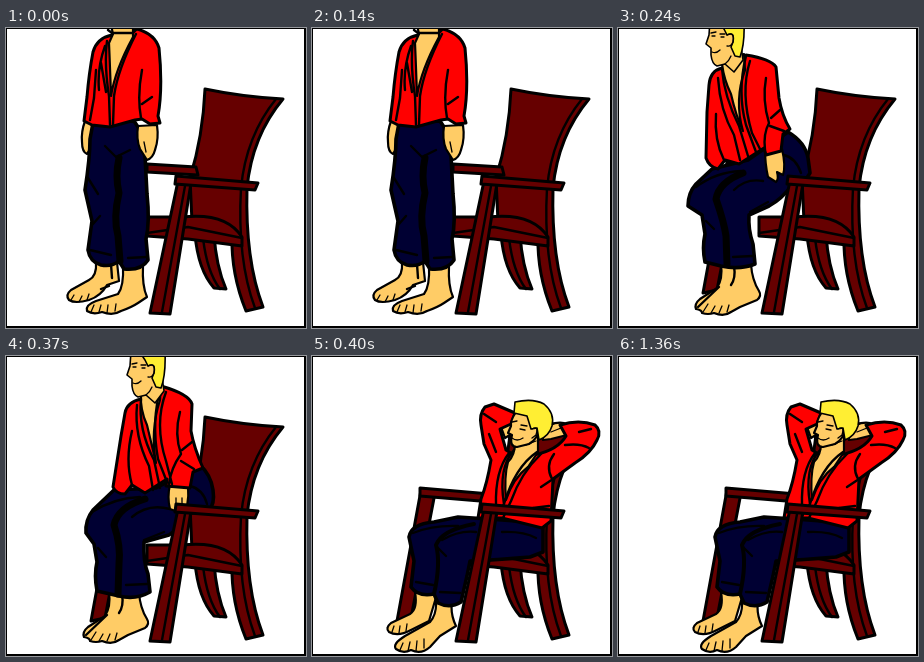
Write an HTML page that moves like this. It is 300 px wide and 300 px high and loops after 2 s.

```html
<!DOCTYPE html>
<html lang="en">
<head>
<meta charset="utf-8">
<title>Sitting down</title>
<style>
  html, body { margin: 0; width: 100%; height: 100%; overflow: hidden; background: #fff; }
  svg { display: block; width: 100vw; height: 100vh; }
  path { stroke: #000; stroke-width: 2.4; stroke-linejoin: round; stroke-linecap: round; fill: none; }
  .wood { fill: #660000; stroke-width: 3; }
  .red { fill: #f00; stroke-width: 3; }
  .navy { fill: #000033; stroke-width: 3.6; }
  .skin { fill: #ffcc66; stroke-width: 2.2; }
  .hair { fill: #ffee33; stroke-width: 1.6; }
  .thin { stroke-width: 1.3; }
  .fold { stroke-width: 7; }
  .frame { stroke-width: 2; stroke-linejoin: miter; }
  .pose { visibility: hidden; animation: 2s step-end infinite; }
  #stand { animation-name: stand; }
  #lean { animation-name: lean; }
  #perch { animation-name: perch; }
  #relax { animation-name: relax; }
  @keyframes stand { 0% { visibility: visible } 12%, 100% { visibility: hidden } }
  @keyframes lean { 0% { visibility: hidden } 12% { visibility: visible } 16%, 100% { visibility: hidden } }
  @keyframes perch { 0% { visibility: hidden } 16% { visibility: visible } 20%, 100% { visibility: hidden } }
  @keyframes relax { 0% { visibility: hidden } 20%, 100% { visibility: visible } }
</style>
</head>
<body>
<svg viewBox="0 0 300 300">
  <defs>
    <g id="feet">
      <path class="skin" d="M103 236Q105 251 99 260L82 271Q76 276 78 281Q84 282 84 285Q90 287 96 285Q106 289 113 284L122 279L139 272Q144 268 141 263Q134 252 133 236Z"/>
      <path d="M101 259L80 279M116 238Q118 250 113 257"/>
      <path class="thin" d="M90 276L85 284M97 278L93 285M104 278L101 285M111 277L109 284"/>
    </g>
    <g id="head">
      <path class="skin" d="M92 -8L91 7L88 16L93 20L93 27Q94 36 99 38L107 36L116 44L125 32L123 18L116 -8Z" style="stroke-width:1.6"/>
      <path class="hair" d="M100 -8L106 1L109 7Q117 3 115 14L113 19L117 28L122 29Q127 16 126 -8Z"/>
      <path class="thin" d="M93 5L98 4M94 8L97 8M102 6L107 6M103 9L106 9M94 24Q98 26 102 22M109 7Q117 3 115 14Q113 19 109 18M107 36Q111 33 113 28"/>
    </g>
    <path id="farLeg" class="wood" d="M109 134L123 137L99 262L85 265Z"/>
    <path id="farArm" class="wood" d="M108 132L190 139L192 147L108 140Z"/>
  </defs>

  <!-- back, seat and rear legs -->
  <path class="wood" d="M189 206Q192 242 208 260L220 261Q210 238 208 206Z"/>
  <path d="M197 210Q201 244 214 261"/>
  <path class="wood" d="M199 61Q237 69 277 71Q246 108 241 160Q239 232 257 279L240 283Q225 246 226 208L186 194L184 150Q197 108 199 61Z"/>
  <path d="M270 71Q240 108 235 160Q231 232 249 280"/>
  <path class="wood" d="M141 189L176 189Q220 184 236 209L236 218L182 211L141 208Z"/>
  <path d="M141 205L182 199L236 210"/>

  <g class="pose" id="stand">
    <path class="wood" d="M141 136L190 139L192 147L141 144Z"/>
    <path class="skin" d="M90 234Q91 248 83 252L65 262Q59 267 63 272Q69 276 83 272Q95 268 101 257L113 253L111 234Z"/>
    <path class="skin" d="M117 238Q118 258 112 266L90 273Q79 277 81 283Q87 287 96 284Q107 288 115 283Q126 279 132 275L141 269Q136 258 137 238Z"/>
    <path class="thin" d="M68 267L65 272M76 268L73 274M83 266L81 272M88 277L85 284M95 277L93 284M102 277L101 285M110 276L109 283"/>
    <path d="M95 261L103 258M105 236L106 250"/>
    <path class="skin" d="M79 93Q75 104 76 114Q76 124 81 126Q87 118 88 96Z"/>
    <path class="navy" d="M87 95L128 93L136 105Q133 112 139 128L141 166Q144 194 140 211L142 232Q135 243 118 241L113 233Q106 239 95 237Q84 234 82 222L86 193L79 162Q84 130 84 111Z"/>
    <path class="fold" d="M113 130Q109 148 113 165Q107 190 112 208L114 233"/>
    <path d="M99 118L110 129L124 122M82 150L92 166M128 93L134 103M84 222L105 227M122 230L140 229M87 196L94 188"/>
    <path class="skin" d="M132 98Q130 111 134 121L141 132Q147 130 149 122Q153 111 151 97Z"/>
    <path class="thin" d="M138 114L140 124"/>
    <path class="red" d="M106 7Q91 10 87 24Q83 45 81 69L78 93L86 97L104 99L129 92L136 91L144 96L154 95L152 88Q157 60 153 20Q149 6 131 1Z"/>
    <path class="skin" d="M105 -3L107 6L103 15Q104 38 105 68Q109 42 127 9L127 -3Z"/>
    <path d="M102 2L106 5L127 5L131 1M101 13Q98 36 103 68L104 97M130 6Q112 41 108 68L107 97M99 18Q91 40 93 62M95 35L100 64M136 42Q131 68 135 90M90 42L88 70L84 92M136 76L146 69"/>
  </g>

  <g class="pose" id="lean">
    <use href="#farLeg"/>
    <use href="#feet"/>
    <path class="navy" d="M170 104Q187 114 190 130L192 145Q188 154 174 157Q164 171 151 178L131 187Q130 202 135 216L137 236Q122 242 103 238L87 234Q84 220 87 206L84 187L70 178Q70 165 78 156L94 141L130 132Z"/>
    <path class="fold" d="M125 145Q101 154 98 171Q106 194 108 208L109 236"/>
    <path d="M78 159Q98 144 123 143M145 153Q128 150 116 162M166 127Q178 130 183 145M88 193L96 201M115 229L134 228M132 184L150 174"/>
    <path class="skin" d="M147 121Q147 136 150 149L158 154Q161 151 159 144L165 147Q168 138 164 121Z"/>
    <path class="red" d="M104 40Q92 43 91 57L89 84L88 130Q91 139 100 141L107 132L121 136L146 120L148 127L163 123L165 106L172 101Q164 88 161 70L158 39Q153 31 128 27Z"/>
    <path class="skin" d="M104 36Q106 52 113 66Q118 88 125 103Q116 72 127 42L126 26Z"/>
    <path d="M104 41Q106 68 121 98L130 128M128 28Q119 64 128 97L138 124M132 33Q122 65 134 105L142 121M100 50Q102 82 116 107L122 132M148 50Q144 72 151 95Q145 106 147 122M98 86Q96 112 106 132M153 90L162 82M152 98L166 103"/>
    <use href="#head"/>
  </g>

  <g class="pose" id="perch">
    <use href="#farLeg"/>
    <use href="#feet"/>
    <path class="navy" d="M194 109Q205 119 207 134Q209 148 203 154L180 158Q172 174 163 179L138 186Q137 205 142 218L144 236Q130 244 113 240L91 235Q88 219 91 206L88 188L80 177Q79 164 87 154L108 134L150 132Z"/>
    <path class="fold" d="M139 143Q112 151 108 169Q115 190 113 208L112 238"/>
    <path d="M86 156Q108 142 134 141M164 153Q142 147 126 161M184 130Q197 133 201 148M120 229L141 228M92 192L100 201M138 184L158 176"/>
    <path class="skin" d="M164 128Q161 142 164 153L172 156L181 151Q183 140 182 128Z"/>
    <path class="thin" d="M170 142L170 153M176 142L176 152"/>
    <path class="red" d="M135 43Q121 46 119 57L115 80L107 131Q110 138 119 138L126 129L139 137L161 123L160 130L184 132L187 116L197 112Q188 92 185 75L186 48Q183 38 155 30Z"/>
    <path class="skin" d="M135 38Q134 54 141 69L150 107Q144 75 154 44L155 28Z"/>
    <path d="M135 43Q132 73 148 104L154 132M155 31Q145 64 152 103L161 126M160 36Q148 68 160 105L166 128M131 49Q128 80 143 110L147 134M174 56Q168 78 175 98Q165 112 163 128M126 75Q119 104 126 129M176 94L186 86M175 105L188 113"/>
    <use href="#head" x="33" y="3"/>
  </g>

  <g class="pose" id="relax">
    <use href="#farLeg"/>
    <use href="#farArm"/>
    <path class="skin" d="M103 236Q106 253 98 258L79 267Q73 272 77 276Q86 281 99 274L117 265L125 238Z"/>
    <path class="skin" d="M124 244Q125 258 118 266L93 280Q80 288 84 293Q91 298 99 294Q109 299 118 291L128 280L144 270Q138 258 140 244Z"/>
    <path class="thin" d="M82 270L80 276M88 270L87 277M95 268L94 275M91 287L88 294M98 286L96 295M105 285L104 295M112 283L112 292"/>
    <path class="navy" d="M176 163L146 161L122 166Q99 168 97 181L102 205L99 231Q106 241 122 238L126 247Q138 253 149 246L155 220L158 205Q184 204 218 201L231 196V167Z"/>
    <path d="M162 168Q130 174 124 189Q129 207 122 238" style="stroke-width:4"/>
    <path d="M101 177Q121 169 146 170M124 190L134 200M130 184Q147 174 164 176M104 226L121 229M128 236L148 237M190 176Q211 175 224 182"/>
    <path class="skin" d="M188 68L199 64L201 77L193 82Z"/>
    <path class="skin" d="M230 76Q239 65 252 67L255 79L239 83L231 84Z"/>
    <path class="red" d="M203 57L182 48L173 51Q167 58 169 69L172 88L179 104Q175 128 169 143L166 162L190 162L230 172L239 165L241 123L263 107Q279 97 285 84Q290 75 283 69Q267 63 248 69L254 80Q246 94 222 99L202 99L194 94L188 73L199 68Z"/>
    <path class="skin" d="M203 87Q203 99 196 106Q192 120 194 144Q201 122 216 111L226 96V80Z"/>
    <path d="M202 94Q186 112 192 148M225 96Q203 111 192 148L183 161M229 98Q209 117 199 145L191 162M197 97Q183 115 184 149M172 58L184 66M177 78L184 96M267 76L279 73M253 89Q268 87 277 92M242 98Q233 110 240 123M229 131L241 123M221 152L237 150"/>
    <path class="skin" d="M204 56Q198 65 199 70L196 77L200 79Q197 91 205 91L217 88Q226 83 227 72L220 56Z"/>
    <path class="hair" d="M202 57L203 46Q221 42 232 48Q243 57 240 70Q237 80 227 84L225 72L219 73L215 60Z"/>
    <path class="thin" d="M200 66L205 65M209 69L215 70M208 73L213 74M200 82Q205 86 211 82M220 73Q227 69 224 79L220 82M214 89L224 85M239 76L249 72"/>
  </g>

  <!-- near side of the chair -->
  <path class="wood" d="M172 153L185 155L164 286L144 285Z"/>
  <path d="M179 158L156 284"/>
  <path class="wood" d="M170 148L252 155L249 162L169 156Z"/>

  <path class="frame" d="M0 0H299V299H0Z"/>
</svg>
</body>
</html>
```
